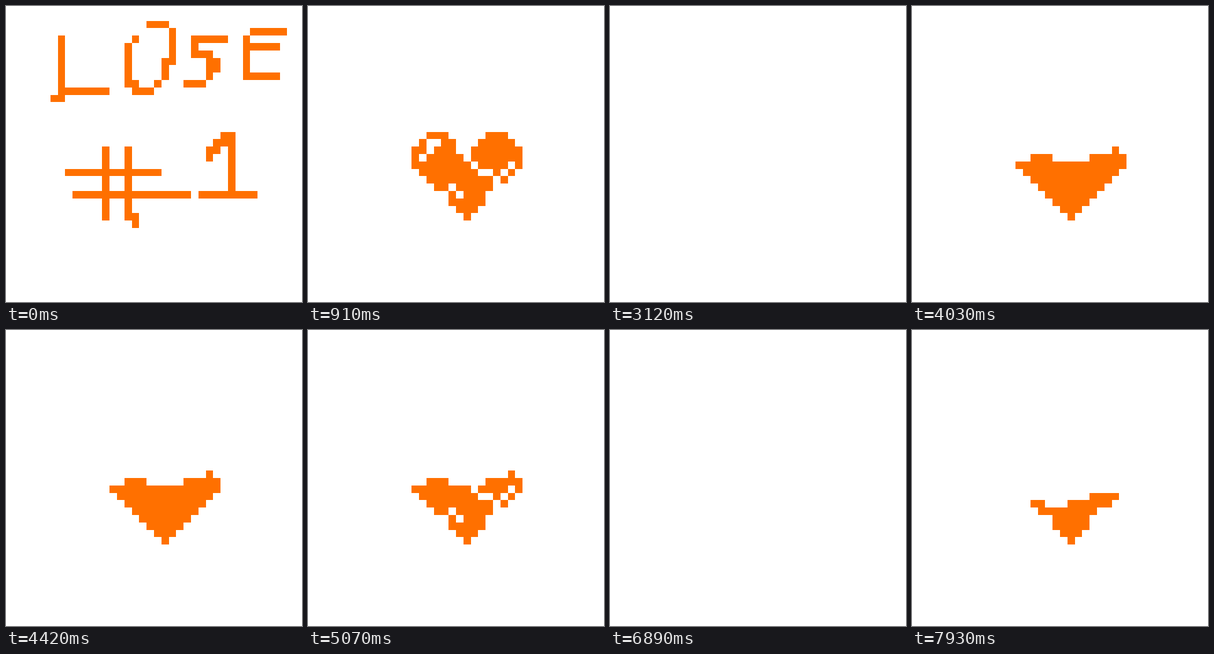
Animation, 512 px wide and 512 px high, one loop 8000 ms. Source, as an HTML page with a canvas:

```html
<!DOCTYPE html>
<html>
<head>
<meta charset="utf-8">
<style>
html, body { margin: 0; width: 100%; height: 100%; overflow: hidden; background: #fff; }
canvas { display: block; width: 100%; height: 100%; image-rendering: pixelated; }
</style>
</head>
<body>
<canvas id="stage" width="40" height="40"></canvas>
<script>
const ctx = document.getElementById('stage').getContext('2d');
const TICK = 130, LOOP = 8000, INK = '#ff7000', PAPER = '#fff';

// Pen strokes through corner points; a slash lifts the pen.
const GLYPHS = {
  L: '7,4 7,11 13,11 / 7,12 6,12',
  O: '19,2 21,2 22,3 22,7 21,7 21,9 19,11 17,11 17,10 16,10 16,5 17,4',
  S: '29,4 25,4 25,6 27,6 27,9 26,10 24,10 / 28,7 28,8',
  E: '37,3 33,3 32,4 32,9 36,9 / 33,5 36,5',
  '#': '13,19 13,28 / 16,19 16,28 17,28 17,29 / 8,22 20,22 / 9,25 24,25',
  1: '27,20 27,19 29,17 30,17 30,25 / 28,19 29,18 / 26,25 33,25',
  2: '28,26 28,25 30,25 / 29,25 29,23 31,21 31,17 29,17 29,18 28,18 28,21 / 31,24 32,24 33,23',
  '.': '35,24 35,25',
  5: '40,16 38,16 38,17 37,18 37,20 39,20 39,19 41,19 41,24 39,24 39,25 38,25'
};
const GLOSS = '15,20 16,19 16,18 17,18';
const CHIPS = '18,25 / 25,24 24,25';
const CRACKS = '22,21 23,22 24,22 25,23 25,24 24,25 / 27,21 25,23 / 18,25 19,24 20,25 / 20,19';

// Top row of the filling in each column.
const lobe = x => Math.abs(Math.abs(x - 21) - 4);
const full = x => 16 + Math.max(1, lobe(x)) + (x === 21);
const half = x => 21 - (lobe(x) < 2 || x > 24) - (x === 27);
const wave = x => Math.round(23 - 0.8 * Math.sin((x - 22.1) / 2));
const flat = row => () => row;
const sink = (shape, part) => x => Math.round(17 + (shape(x) - 17) * part);

// beat: ticks between the two blinks; the heart then cracks and drains.
const SCENES = [
  { at: 0, label: '1', start: full, beat: 3, steps: 6, drain: k => flat(17 + 2 * k), holes: CRACKS },
  { at: 19, label: '1.5', start: full, beat: 2, steps: 5, drain: k => sink(half, k / 5), holes: '' },
  { at: 33, label: '2', start: half, beat: 2, steps: 4, drain: k => flat(21 + 2 * k), holes: CRACKS },
  { at: 48, label: '2.5', start: full, beat: 2, steps: 6, drain: k => sink(wave, k / 6), holes: CHIPS }
];

function stroke(path, color, shift = 0) {
  ctx.fillStyle = color;
  for (const line of path.split('/')) {
    const points = line.trim().split(' ').map(p => p.split(',').map(Number));
    points.forEach(([x, y], i) => {
      const [px, py] = points[Math.max(0, i - 1)];
      const n = Math.max(Math.abs(x - px), Math.abs(y - py));
      for (let s = 0; s <= n; s++) {
        const t = n ? s / n : 0;
        ctx.fillRect(Math.round(px + (x - px) * t) + shift, Math.round(py + (y - py) * t), 1, 1);
      }
    });
  }
}

function drawTitle(label) {
  const shift = label.length > 1 ? -5 : 0;
  for (const c of 'LOSE#' + label) stroke(GLYPHS[c], INK, shift);
}

function drawHeart(top, holes) {
  ctx.fillStyle = INK;
  for (let x = 14; x <= 28; x++) {
    const y = Math.max(full(x), top(x)), end = 29 - Math.abs(x - 21);
    if (y < end) ctx.fillRect(x, y, 1, end - y);
  }
  stroke(GLOSS, PAPER);
  if (holes) stroke(holes, PAPER);
}

function draw(ms) {
  const tick = Math.floor(ms / TICK);
  const { at, label, start, beat, steps, drain, holes } = SCENES.findLast(s => s.at <= tick);
  const n = tick - at, crack = beat + 4, k = n - crack - 1;
  ctx.fillStyle = PAPER;
  ctx.fillRect(0, 0, 40, 40);
  if (n === 0) drawTitle(label);
  else if (k > 0) drawHeart(drain(Math.min(k, steps)), holes);
  else if (n !== 3 && n !== 3 + beat) drawHeart(start, n < crack ? '' : CRACKS);
}

const begin = performance.now();
function loop() {
  draw((performance.now() - begin) % LOOP);
  requestAnimationFrame(loop);
}
loop();
</script>
</body>
</html>
```
